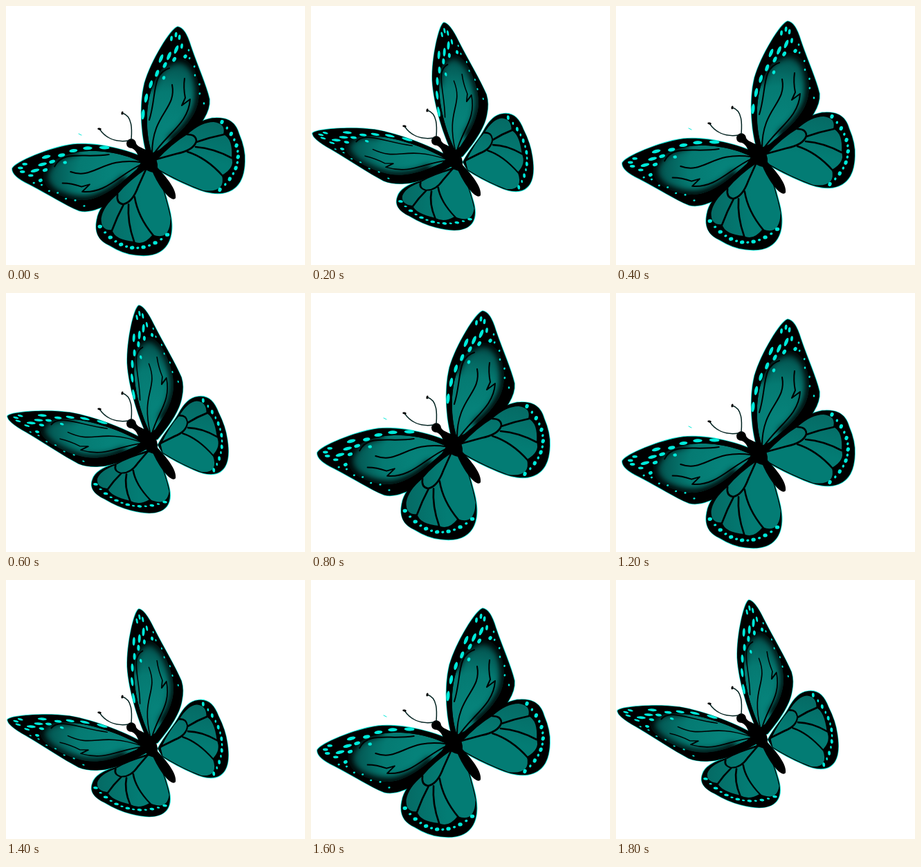
Animation of 432 by 375 pixels, one loop 2000 ms. Source, as an HTML page with a canvas:

```html
<!DOCTYPE html>
<html lang="en">
<head>
<meta charset="utf-8">
<title>Butterfly</title>
<style>
  html, body { margin: 0; width: 100%; height: 100%; overflow: hidden; background: #fff; }
  canvas { display: block; }
</style>
</head>
<body>
<canvas id="stage" width="432" height="375"></canvas>
<script>
const ctx = document.getElementById('stage').getContext('2d');
const STEP = 200;
const LIFT = [0, -4, -8, -10, -4, 6, 8, 14, 11, 1];
const CYAN = '#00e9d9', TEAL = '#037c74';

// Wings are drawn once, on the right, spread open.
const fore = new Path2D(`M248 30 C238 33 210 78 200 112 C192 145 195 195 207 225 L222 222
  C245 206 275 184 286 163 Q295 148 294 135 C289 113 277 88 267 58 Q259 31 248 30Z`);
const foreInner = new Path2D(`M211 213 C199 180 199 110 235 81 C251 70 267 78 274 96
  C283 125 279 146 268 162 C255 182 238 194 222 208Z`);
const foreShade = new Path2D('M209 115 C215 98 224 86 235 81 C251 70 267 78 274 96 C283 125 279 146 268 162 Q257 180 240 192');
const foreVeins = new Path2D(`M236 90 C210 98 218 130 207 165
  M240 114 C247 150 211 155 211 214
  M258 105 Q256 118 259 133 L254 144 L266 135 C264 170 232 185 213 215`);

const hind = new Path2D(`M211 224 C228 207 247 196 260 184 Q282 162 303 162
  C324 161 333 171 337 186 Q346 207 345 225 C344 275 308 279 271 263 Q240 250 217 236Z`);
const hindInner = new Path2D(`M217 224 Q240 199 262 186 Q282 168 300 168 Q318 170 314 186
  Q328 192 326 220 Q331 234 312 245 Q318 271 285 267 Q250 254 218 235Z`);
const hindVeins = new Path2D(`M262 186 Q275 186 275 196 Q271 209 246 214 L217 222
  M275 197 Q295 190 315 186 M274 204 Q300 206 326 220 M262 211 Q290 220 313 246`);

const body = new Path2D(`M174 199 C175 190 187 190 188 199 C190 205 204 207 212 214
  Q220 224 219 234 C232 248 247 266 245 278 C240 286 222 264 212 241
  Q196 238 192 220 Q188 208 182 206 Q174 206 174 199Z`);
const antennae = new Path2D('M181 193 C182 180 183 159 168 155 M177 195 C157 198 143 190 135 178');

// Map that scales and skews around the point (x, y), then shifts it.
function about(x, y, [a, b, c, d], dx = 0, dy = 0) {
  return new DOMMatrix([a, b, c, d, x - a * x - c * y + dx, y - b * x - d * y + dy]);
}
const axis = 2 * 49.35 * Math.PI / 180;
const mirror = about(128, 132, [Math.cos(axis), Math.sin(axis), Math.sin(axis), -Math.cos(axis)]);
const still = new DOMMatrix();
const spread = [{ fore: mirror, hind: mirror }, { fore: still, hind: still }];
const raised = [
  {
    fore: about(204, 232, [1.036, .237, .038, .75]).multiply(mirror),
    hind: about(206, 233, [1.035, .18, -.056, .69], 1, 7).multiply(mirror)
  },
  {
    fore: about(212, 224, [.774, -.03, .247, 1.005]),
    hind: about(212, 224, [.749, -.069, .18, 1.027], 8, 6)
  }
];

function placed(m, draw) {
  ctx.save();
  ctx.transform(m.a, m.b, m.c, m.d, m.e, m.f);
  draw();
  ctx.restore();
}

function stroke(path, color, width) {
  ctx.strokeStyle = color;
  ctx.lineWidth = width;
  ctx.stroke(path);
}

function fill(path, color) {
  ctx.fillStyle = color;
  ctx.fill(path);
}

function spot(x, y, rx, ry = rx * 1.25, angle = .3, color = CYAN) {
  ctx.beginPath();
  ctx.ellipse(x, y, rx, ry, angle, 0, 7);
  ctx.fillStyle = color;
  ctx.fill();
}

// Calls draw(x, y, i, t) at even steps along a quadratic curve.
function along([x0, y0], [x1, y1], [x2, y2], count, draw) {
  for (let i = 0; i < count; i++) {
    const t = i / (count - 1), s = 1 - t;
    const mix = (p, q, r) => s * s * p + 2 * s * t * q + t * t * r;
    draw(mix(x0, x1, x2), mix(y0, y1, y2), i, t);
  }
}

function drawFore() {
  fill(fore, '#000');
  ctx.save();
  ctx.clip(foreInner);
  const glow = ctx.createRadialGradient(235, 180, 10, 235, 180, 112);
  glow.addColorStop(0, '#06827a');
  glow.addColorStop(.45, '#057a72');
  glow.addColorStop(.75, '#045d58');
  glow.addColorStop(1, '#013532');
  fill(foreInner, glow);
  ctx.filter = 'blur(4px)';
  stroke(foreShade, '#000', 11);
  ctx.restore();
  stroke(foreVeins, '#000', 2);

  along([198, 157], [208, 80], [259, 73], 7, (x, y, i, t) => spot(x, y, 2.5, 7.5 - 4.5 * t, .1 + .5 * t));
  along([224, 76], [236, 75], [246, 63], 3, (x, y) => spot(x, y, 2.4, 6.5, .4));
  along([239, 47], [250, 32], [254, 58], 4, (x, y) => spot(x, y, 1.9, 3.8, .1));
  along([264, 64], [277, 98], [286, 141], 7, (x, y, i) => spot(x - i % 2 * 3, y, 1.3));
  spot(228, 104, 2.2);
}

function drawHind() {
  fill(hind, '#000');
  const shade = ctx.createLinearGradient(296, 166, 285, 225);
  shade.addColorStop(0, '#056a64');
  shade.addColorStop(1, TEAL);
  fill(hindInner, shade);
  stroke(hindVeins, '#000', 2.6);
  along([312, 168], [360, 220], [309, 266], 13, (x, y, i) => spot(x, y, i % 2 ? 1.7 : 2.6));
}

function drawBody() {
  fill(body, '#000');
  stroke(antennae, '#00211f', 1.5);
  spot(168, 155, 1.5, 2.6, .2, '#000');
  spot(135, 178, 2.8, 1.5, .2, '#000');
}

function drawButterfly(step) {
  const open = step % 2 === 0;
  ctx.fillStyle = '#fff';
  ctx.fillRect(0, 0, 432, 375);
  ctx.save();
  ctx.translate(0, LIFT[step]);
  ctx.lineCap = ctx.lineJoin = 'round';
  for (const wing of open ? spread : raised) {
    placed(wing.fore, () => stroke(fore, CYAN, 1.6));
    placed(wing.hind, () => stroke(hind, CYAN, 1.6));
    placed(wing.fore, drawFore);
    placed(wing.hind, drawHind);
  }
  drawBody();
  if (open) stroke(new Path2D('M105 185 L109 187'), CYAN, 1);
  ctx.restore();
}

let shown = -1;
function tick(now) {
  const step = Math.floor(now / STEP) % LIFT.length;
  if (step !== shown) drawButterfly(shown = step);
  requestAnimationFrame(tick);
}
drawButterfly(0);
requestAnimationFrame(tick);
</script>
</body>
</html>
```
